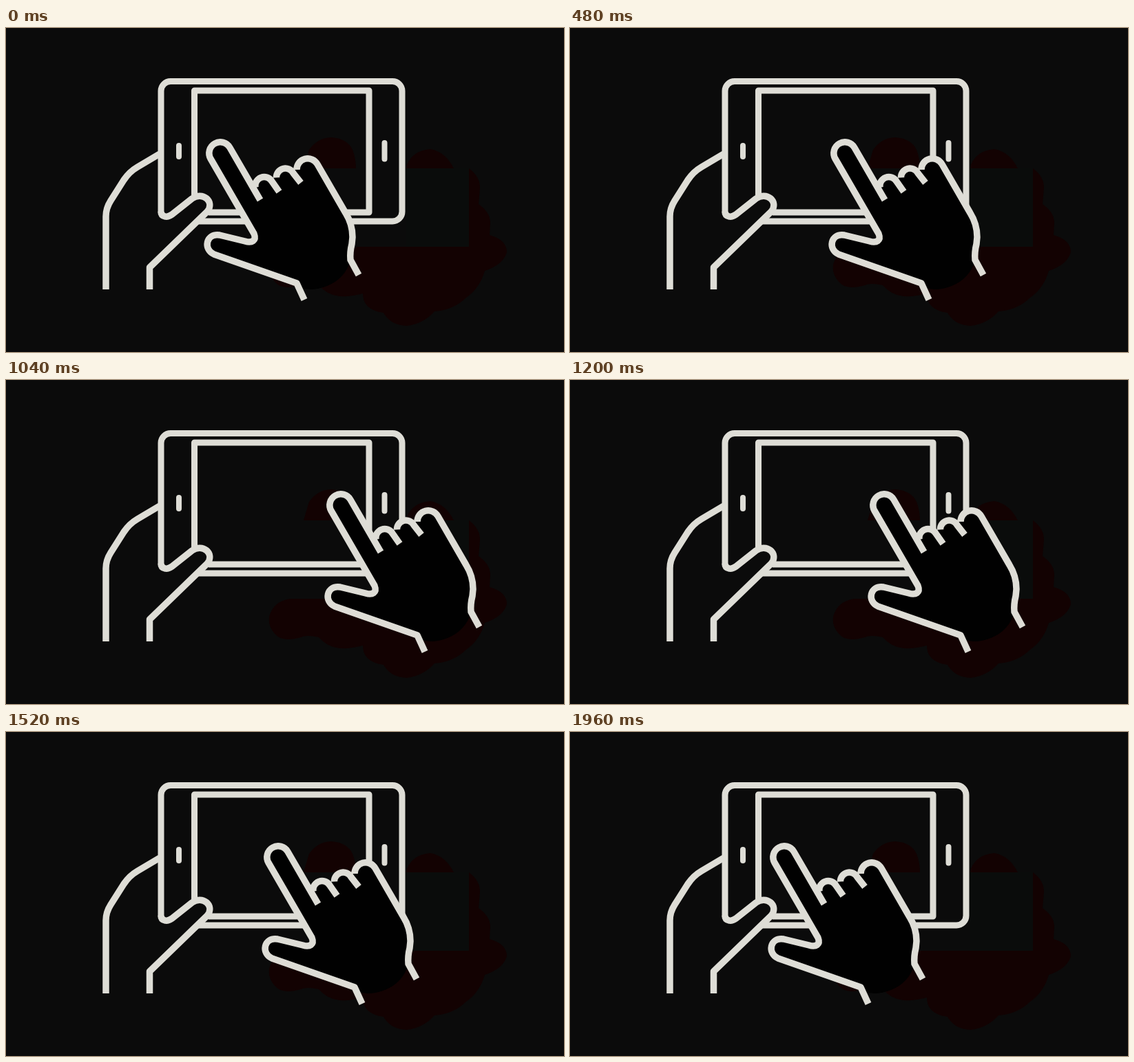
An HTML page with a canvas that plays this animation: 810x471 px, repeating every 2 s.

```html
<!DOCTYPE html>
<html lang="en">
<head>
<meta charset="utf-8">
<title>Swipe on a phone</title>
<style>
  html, body { margin: 0; width: 100%; height: 100%; overflow: hidden; background: #0b0b0b; }
  canvas { display: block; }
</style>
</head>
<body>
<canvas id="stage" width="810" height="471"></canvas>
<script>
const ctx = document.getElementById('stage').getContext('2d');
const INK = '#deddd6', BACK = '#0b0b0b', GLOW = '#130202', SHADE = '#0a0c0b', HAND = '#010101';
const STEP = 40, STEPS = 50, TURN = 25, REACH = 183;

const glow = [
  'M432 204Q437 187 440 177Q452 160 471 159Q495 160 503 177Q508 190 508 204Z',
  'M580 204Q588 178 616 176Q638 180 650 204Z',
  `M672 204Q688 216 688 232L686 256Q703 268 703 283L702 301Q727 308 727 326
   Q722 344 695 353Q688 378 668 392Q650 410 622 412Q606 430 582 433Q558 432 548 414
   Q518 410 518 386Q500 391 484 390Q466 388 454 374Q436 370 428 374Q408 380 396 374
   Q380 362 382 344Q388 322 412 318H672Z`
].map(d => new Path2D(d));

const phone = new Path2D(
  `M225 268V91.5A14 14 0 0 1 239 77.5H561A14 14 0 0 1 575 91.5V267A14 14 0 0 1 561 281H278
   M273.5 246V91H527V268H294`);
const buttons = new Path2D('M251 171V187M549.5 167V190.5');
const holder = new Path2D(
  `M223 183L191 202Q179 209 171 221L152 251Q145 262 145 274V380
   M208.5 380V348L292 267C304 252 285 237 270 248L241 271Q235 275 231 274Q225 273 225 267`);

// Pointing hand, left end of its travel
const finger = 'L302 329C286 322 290 298 310 301L347 310C357 313 364 309 360 299L297 190A16 16 0 0 1 325 174';
const side = 'L493 269Q503 285 503 304L502 314Q499 326 500 337';
const body = new Path2D(
  `M422 371${finger}L362 232A13 13 0 0 1 386 223L392.5 217.5A13 13 0 0 1 417 211
   L422 206A16 16 0 0 1 452 198${side}Q493 364 466 375Q444 384 424 377Z`);
const outline = new Path2D(
  `M433 395L422 371${finger}L369 250
   M362 232A13 13 0 0 1 386 223L396.5 238
   M392.5 217.5A13 13 0 0 1 417 211L428 225
   M422 206A16 16 0 0 1 452 198${side}L512 359`);

function line(path, width, cap = 'butt') {
  ctx.lineWidth = width;
  ctx.lineCap = cap;
  ctx.stroke(path);
}

function draw(now) {
  const n = Math.floor(now % (STEP * STEPS) / STEP);
  const x = n <= TURN ? REACH * n / TURN : REACH * (STEPS - 1 - n) / (STEPS - 1 - TURN);

  ctx.fillStyle = BACK;
  ctx.fillRect(0, 0, 810, 471);
  ctx.fillStyle = SHADE;
  ctx.fillRect(580, 204, 92, 114);
  ctx.fillStyle = GLOW;
  for (const path of glow) ctx.fill(path);

  ctx.strokeStyle = INK;
  ctx.lineJoin = 'round';
  line(phone, 9);
  line(buttons, 8, 'round');
  line(holder, 9.5);

  ctx.save();
  ctx.translate(Math.round(x), 0);
  ctx.fillStyle = HAND;
  ctx.fill(body);
  line(outline, 9.5);
  ctx.restore();
}

const start = performance.now();
function tick() {
  draw(performance.now() - start);
  requestAnimationFrame(tick);
}
tick();
</script>
</body>
</html>
```
